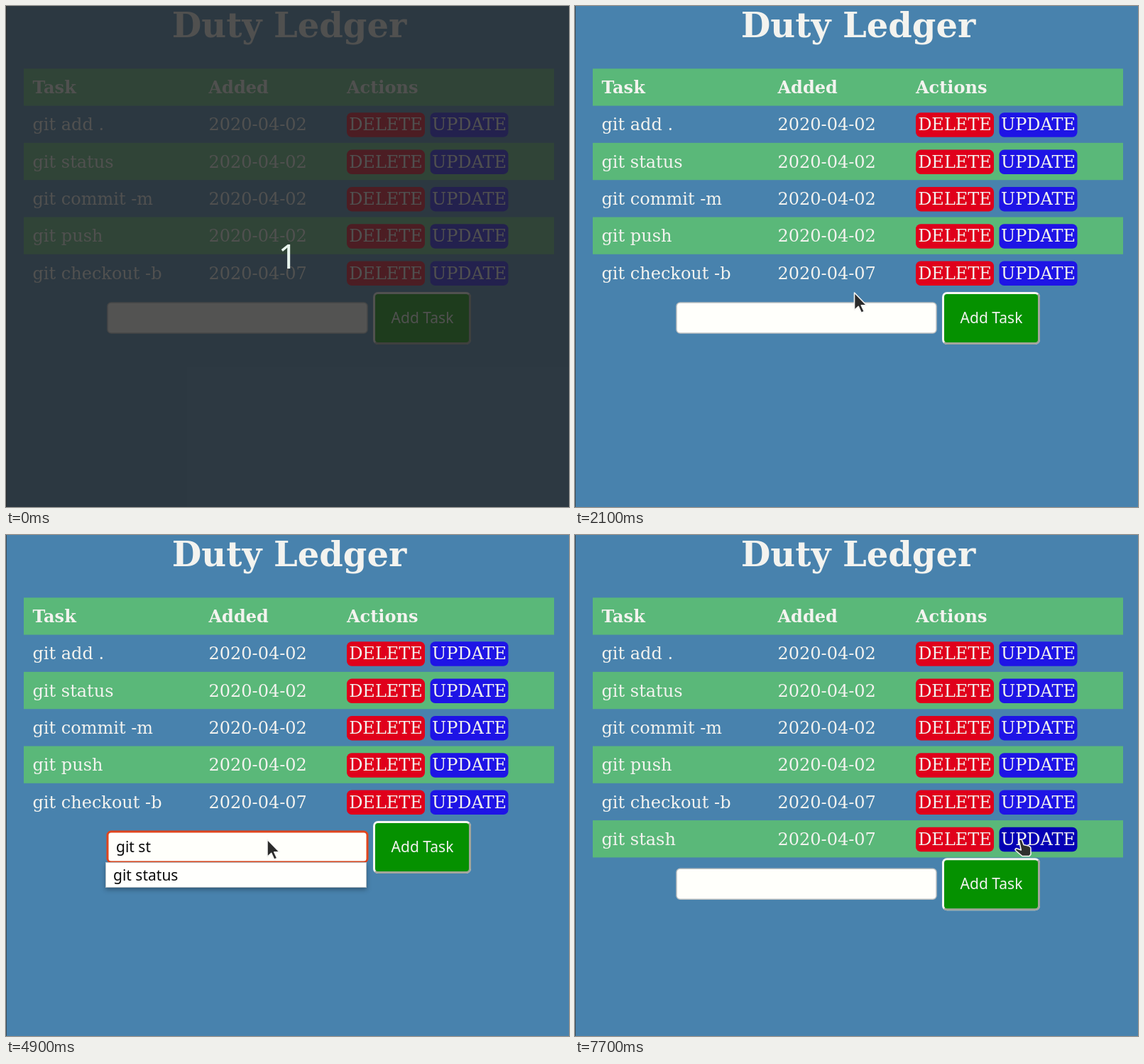
Animation of 793 by 706 pixels, one loop 8 s. Source, as an HTML page:

```html
<!DOCTYPE html>
<html lang="en">
<head>
<meta charset="utf-8">
<title>Duty Ledger</title>
<style>
  html, body { margin: 0; width: 100%; height: 100%; overflow: hidden; background: #4882ad; }
  svg { display: block; width: 793px; height: 706px; }
  text { font: 24px "DejaVu Serif", serif; fill: #f3f3ef; white-space: pre; }
  .bold { font-weight: bold; }
  .title { font-size: 48px; text-anchor: middle; }
  .ui, .dark { font: 21px "Noto Sans", "Open Sans", sans-serif; }
  .dark { fill: #0a0a0a; }
  .mid { text-anchor: middle; }
  .stripe { fill: #5ab879; }
  .delete { fill: #e0001b; }
  .delete.hover { fill: #ad0012; }
  .update { fill: #1e14e6; }
  .update.hover { fill: #0500b4; }
  #face { fill: #059100; }
  #face.hover { fill: #046c00; }
  #field { fill: #fffffb; stroke: #bdc1c2; stroke-width: 1.5; }
  #field.focus { stroke: #e0451d; stroke-width: 3; }
  #popup { filter: drop-shadow(0 3px 3px rgba(0, 0, 0, .3)); }
  #count { font: 47px "Noto Sans", "Open Sans", sans-serif; fill: #e8f5ee; text-anchor: middle; }
</style>
</head>
<body>
<svg viewBox="0 0 793 706">
  <defs>
    <clipPath id="lowerRight"><path d="M517 477L524 470L648 410L655 403V477Z"/></clipPath>
  </defs>
  <rect width="793" height="706" fill="#4882ad"/>
  <rect width="1" height="706" fill="#3c4b56"/>
  <text class="bold title" x="399" y="44">Duty Ledger</text>
  <g id="table"></g>
  <g id="form">
    <rect id="field" x="143" y="418" width="366" height="43" rx="5"/>
    <text id="typed" class="dark" x="155" y="447"></text>
    <rect id="caret" y="427" width="1.5" height="25" fill="#111"/>
    <rect x="517" y="403" width="138" height="74" rx="7" fill="#f6f6f2"/>
    <rect x="517" y="403" width="138" height="74" rx="7" fill="#a3a59b" clip-path="url(#lowerRight)"/>
    <rect id="face" x="520" y="406" width="132" height="68" rx="4"/>
    <text class="ui mid" x="586.5" y="447">Add Task</text>
  </g>
  <g id="popup">
    <rect id="list" x="140.5" y="461.5" width="367" fill="#fffffd" stroke="#b9bfc3"/>
    <g id="items"></g>
  </g>
  <g id="cursor">
    <path id="arrow" transform="translate(-1.5 -3)" d="M0 0V24.5L5.7 19.3L9.8 28.3L13.8 26.4L9.8 17.8H17.2Z"
      fill="#2b2b2b" stroke="#f4f4f2" stroke-width="1.6" stroke-linejoin="round"/>
    <g id="beam" fill="none" stroke-linecap="square">
      <path id="beamShape" d="M-3.5 -11.5H-1.5L0 -10L1.5 -11.5H3.5M0 -10V10M-3.5 11.5H-1.5L0 10L1.5 11.5H3.5" stroke="#fff" stroke-width="4"/>
      <use href="#beamShape"/>
      <path d="M-3.5 -11.5H-1.5L0 -10L1.5 -11.5H3.5M0 -10V10M-3.5 11.5H-1.5L0 10L1.5 11.5H3.5" stroke="#1c1c1c" stroke-width="1.8"/>
    </g>
    <path id="hand" d="M-1.5 1C-1.5 -1.5 2 -1.5 2.8 .5L5 6.5L11.5 8C14 8.6 15 10 15 12.5V20L13 22.5H3L-6.5 14.5C-8 13 -6 11 -4 12L1.3 14Z"
      fill="#2f302d" stroke="#f4f4f2" stroke-width="1.6" stroke-linejoin="round"/>
  </g>
  <g id="veil">
    <rect width="793" height="706" fill="#262626" fill-opacity=".79"/>
    <text id="count" x="397" y="370">1</text>
  </g>
</svg>
<script>
const LOOP = 8000, ROW = 52.3, SAVED = 7700;
const $ = id => document.getElementById(id);

function add(parent, tag, attrs, text) {
  const el = document.createElementNS('http://www.w3.org/2000/svg', tag);
  for (const k in attrs) el.setAttribute(k, attrs[k]);
  if (text) el.textContent = text;
  return parent.appendChild(el);
}
const show = (el, on) => { el.style.display = on ? '' : 'none'; };

// [time, x, y] of the pointer's hot spot
const moves = [
  [600, 125, 51], [700, 183, 243], [900, 198, 333], [1000, 215, 405],
  [1200, 226, 428], [1300, 262, 442], [1400, 318, 450], [1500, 388, 454],
  [1600, 468, 455], [1700, 560, 465], [1800, 602, 452], [1900, 588, 425],
  [2000, 540, 384], [2100, 395, 407], [2400, 381, 424], [2500, 369.5, 432],
  [6800, 388, 433], [6900, 440, 437], [7000, 515, 442], [7100, 592, 445],
  [7200, 646, 441], [7300, 627, 430]
];
// [time, typed text]
const typing = [
  [0, ''], [3700, 'g'], [3900, 'gi'], [4000, 'git'], [4100, 'git '], [4400, 'git s'],
  [4800, 'git st'], [5200, 'git sta'], [5400, 'git stas'], [5600, 'git stash'], [SAVED, '']
];
// [time, suggestions]
const hints = [
  [0, []],
  [3700, ['git add .', 'git checkout -b', 'git commit -m', 'git push', 'git status']],
  [4500, ['git status', 'git push']],
  [4900, ['git status']],
  [5500, []]
];
const carets = [[0, false], [2500, true], [3600, false], [3700, true], [4900, false], [5200, true], [6400, false]];

const at = (track, t) => track.filter(k => k[0] <= t).pop();

const tasks = [
  ['git add .', '2020-04-02'], ['git status', '2020-04-02'], ['git commit -m', '2020-04-02'],
  ['git push', '2020-04-02'], ['git checkout -b', '2020-04-07'], ['git stash', '2020-04-07']
];
const links = [];
let lastRow;

function addRow(i, cells, cls = '') {
  const y = 88.3 + i * ROW, g = add($('table'), 'g', {});
  if (i % 2 === 0) add(g, 'rect', { class: 'stripe', x: 25, y, width: 747, height: ROW });
  cells.forEach((s, c) => add(g, 'text', { class: cls, x: [37.5, 285.5, 480][c], y: y + 34.7 }, s));
  return g;
}
function addLink(g, i, kind, x) {
  const y = 98 + i * ROW;
  const el = add(g, 'rect', { class: kind, x, y, width: 110, height: 34.5, rx: 7 });
  add(g, 'text', { class: 'mid', x: x + 55, y: y + 25 }, kind.toUpperCase());
  links.push({ el, x, y, row: i });
}
addRow(0, ['Task', 'Added', 'Actions'], 'bold');
tasks.forEach((task, n) => {
  lastRow = addRow(n + 1, task);
  addLink(lastRow, n + 1, 'delete', 480);
  addLink(lastRow, n + 1, 'update', 597.5);
});

function inside(p, x, y, w, h) {
  return !!p && p[1] >= x && p[1] <= x + w && p[2] >= y && p[2] <= y + h;
}

function render(t) {
  const saved = t >= SAVED, shift = saved ? ROW : 0;
  const p = at(moves, t), items = at(hints, t)[1];

  show($('veil'), t < 100);
  show(lastRow, saved);
  $('form').setAttribute('transform', `translate(0 ${shift})`);

  $('field').classList.toggle('focus', t >= 2500 && t < 6600);
  $('typed').textContent = at(typing, t)[1];
  show($('caret'), at(carets, t)[1]);
  $('caret').setAttribute('x', 155 + $('typed').getComputedTextLength());

  show($('popup'), items.length);
  $('list').setAttribute('height', 5 + 30 * items.length);
  $('items').replaceChildren();
  items.forEach((s, i) => add($('items'), 'text', { class: 'dark', x: 151, y: 487 + 30 * i }, s));

  let pointing = inside(p, 517, 403 + shift, 138, 74);
  $('face').classList.toggle('hover', pointing);
  for (const l of links) {
    const over = (l.row < 6 || saved) && inside(p, l.x, l.y, 110, 34.5);
    l.el.classList.toggle('hover', over);
    pointing = pointing || over;
  }
  const editing = !items.length && inside(p, 142, 417 + shift, 367, 45);
  show($('cursor'), p);
  show($('hand'), pointing);
  show($('beam'), editing);
  show($('arrow'), !pointing && !editing);
  if (p) $('cursor').setAttribute('transform', `translate(${p[1]} ${p[2]})`);
}

let last = -1;
function tick() {
  const t = Math.floor(performance.now() % LOOP / 100) * 100;
  if (t !== last) render(last = t);
  requestAnimationFrame(tick);
}
tick();
</script>
</body>
</html>
```
